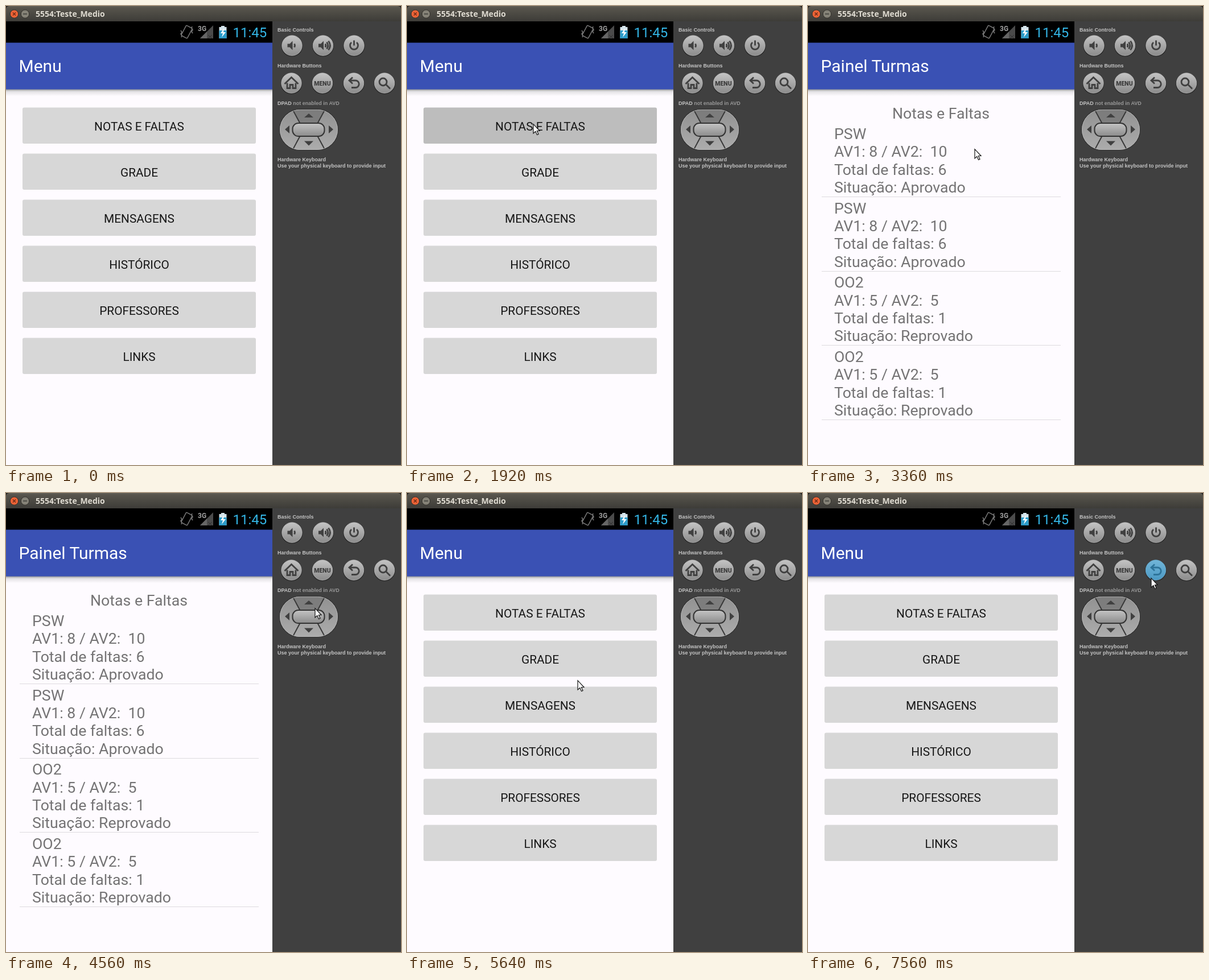
An HTML page that plays this animation: 694x807 px, repeating every 8 s.

```html
<!DOCTYPE html>
<html lang="pt">
<head>
<meta charset="utf-8">
<title>Menu</title>
<style>
  html, body { margin: 0; width: 100%; height: 100%; overflow: hidden; background: #1c1b19; }
  svg { display: block; width: 100%; height: 100%; }
  text { white-space: pre; font-family: Roboto, sans-serif; }
  .label { font: bold 9px "Liberation Sans", Arial, sans-serif; fill: #c3c3c3; }
  .heading { font-size: 30px; fill: #fff; }
  .item { font-size: 26.7px; fill: #747374; }
  .button { font-size: 20.8px; fill: #161616; text-anchor: middle; }
  .icon { fill: none; stroke: #404040; stroke-width: 2.8; }
  .solid { fill: #404040; stroke: none; }
  .hover .face { fill: url(#blue); stroke: #6fb0d2; }
  .hover .icon { stroke: #2d7399; }
</style>
</head>
<body>
<svg viewBox="0 0 694 807" xmlns="http://www.w3.org/2000/svg">
  <defs>
    <linearGradient id="bar" x2="0" y2="1">
      <stop stop-color="#625f56"/><stop offset=".12" stop-color="#57544c"/><stop offset="1" stop-color="#3c3b37"/>
    </linearGradient>
    <linearGradient id="shade" x2="0" y2="1">
      <stop stop-color="#8b8d92"/><stop offset=".12" stop-color="#b9babd"/>
      <stop offset=".35" stop-color="#e5e3e6"/><stop offset="1" stop-color="#fefbff"/>
    </linearGradient>
    <linearGradient id="metal" x2="0" y2="1">
      <stop stop-color="#c4c4c4"/><stop offset="1" stop-color="#8b8b8b"/>
    </linearGradient>
    <linearGradient id="pad" x2="0" y2="1">
      <stop stop-color="#919191"/><stop offset="1" stop-color="#acacac"/>
    </linearGradient>
    <linearGradient id="blue" x2="0" y2="1">
      <stop stop-color="#71b5d8"/><stop offset="1" stop-color="#4b99c4"/>
    </linearGradient>
    <clipPath id="padShape"><rect x="481" y="182" width="102" height="71" rx="36"/></clipPath>
  </defs>

  <!-- window frame -->
  <path d="M0 28V6Q0 0 6 0H688Q694 0 694 6V28Z" fill="url(#bar)"/>
  <circle cx="14.5" cy="14" r="7.2" fill="#ec6336" stroke="#33312c"/>
  <path d="M12 11.5l5 5m0-5l-5 5" stroke="#6b2b18" stroke-width="1.4"/>
  <circle cx="33.5" cy="14" r="7.2" fill="#858277" stroke="#33312c"/>
  <path d="M30 14h7" stroke="#3c3b37" stroke-width="1.5"/>
  <text x="52" y="19" fill="#e0dcd2" style="font:bold 14px 'Open Sans',sans-serif">5554:Teste_Medio</text>

  <!-- phone -->
  <rect y="27" width="468" height="780" fill="#fefbff"/>
  <rect y="27" width="468" height="38" fill="#000"/>
  <g fill="none" stroke="#777" stroke-width="1.5">
    <rect x="311.5" y="35.5" width="12" height="20" rx="1.5" transform="rotate(28 317.5 45.5)"/>
    <path d="M307 43l2 3-2 3 2 3-1 3M327 36l-1 3 2 3-2 3 2 3"/>
  </g>
  <path d="M364 34V57H341Z" fill="#4b4b4b"/>
  <path d="M353 45V57H341Z" fill="#666"/>
  <path d="M355 51l7 6m0-6l-7 6" stroke="#303030"/>
  <text x="337" y="44" fill="#a0a0a0" font-size="12" font-weight="bold">3G</text>
  <path d="M378 35h6v2h3.500v20h-13v-20h3.500z" fill="#d5e4eb"/>
  <path d="M374.500 43h13v14h-13z" fill="#2c9cca"/>
  <path d="M383 39l-6 9h4l-2 7 7-9h-4z" fill="#fff"/>
  <text x="398.500" y="55" fill="#33b5e5" font-size="24">11:45</text>
  <rect y="64.500" width="468" height="82.500" fill="#3a51b4"/>
  <rect y="146.500" width="468" height="12" fill="url(#shade)"/>
  <g id="menu"><text class="heading" x="22.500" y="116">Menu</text></g>
  <g id="grades">
    <text class="heading" x="22.500" y="116">Painel Turmas</text>
    <text class="item" x="233.500" y="198" text-anchor="middle">Notas e Faltas</text>
  </g>

  <!-- control panel -->
  <rect x="468" y="27" width="226" height="780" fill="#404040"/>
  <g>
    <text class="label" x="477" y="44.500">Basic Controls</text>
    <text class="label" x="477" y="107.500">Hardware Buttons</text>
    <text class="label" x="477" y="174">DPAD <tspan fill="#989898">not enabled in AVD</tspan></text>
    <text class="label" x="477" y="272.500">Hardware Keyboard</text>
    <text class="label" x="477" y="283.500">Use your physical keyboard to provide input</text>
  </g>
  <g id="controls"></g>
  <rect x="480" y="181" width="104" height="73" rx="36.500" fill="#2b2b2b"/>
  <g clip-path="url(#padShape)">
    <rect x="481" y="182" width="102" height="71" fill="url(#pad)"/>
    <path d="M503 180H561L547 207H517Z" fill="#7d7d7d"/>
    <path d="M503 181L517 207M561 181L547 207M503 254L517 228M561 254L547 228" stroke="#383838" stroke-width="2"/>
  </g>
  <rect x="481.500" y="182.500" width="101" height="70" rx="35" fill="none" stroke="#b9b9b9" stroke-width=".8"/>
  <rect x="503.500" y="206" width="56" height="23" rx="10" fill="url(#metal)" stroke="#333" stroke-width="2"/>
  <path class="solid" d="M524 196l8-7 8 7zM524 237.500l8 8 8-8zM498 210v14l-8-7zM567 210v14l8-7z"/>

  <path id="cursor" d="M0 .7V17L3.800 13.500 6.500 19.500 9 18.400 6.400 12.500H11Z"
        fill="#fff" stroke="#151515" stroke-width="1.200"/>
</svg>

<script>
const LOOP = 8000, TICK = 120, PITCH = 81, ROW = 130.7;
const $ = id => document.getElementById(id);

function add(parent, tag, attrs, text) {
  const node = document.createElementNS('http://www.w3.org/2000/svg', tag);
  for (const key in attrs) node.setAttribute(key, attrs[key]);
  if (text) node.textContent = text;
  return parent.appendChild(node);
}

const buttons = ['NOTAS E FALTAS', 'GRADE', 'MENSAGENS', 'HISTÓRICO', 'PROFESSORES', 'LINKS'].map((name, i) => {
  const y = 178.5 + i * PITCH;
  const box = add($('menu'), 'rect', { x: 29, y, width: 410, height: 63.5, rx: 3 });
  add($('menu'), 'text', { class: 'button', x: 234, y: y + 40 }, name);
  return box;
});

const passed = ['PSW', 'AV1: 8 / AV2:  10', 'Total de faltas: 6', 'Situação: Aprovado'];
const failed = ['OO2', 'AV1: 5 / AV2:  5', 'Total de faltas: 1', 'Situação: Reprovado'];
[passed, passed, failed, failed].forEach((lines, i) => {
  lines.forEach((line, j) =>
    add($('grades'), 'text', { class: 'item', x: 46, y: 234 + i * ROW + j * 31.3 }, line));
  add($('grades'), 'rect', { x: 24, y: Math.round(335 + i * ROW), width: 420, height: 1, fill: '#dddbde' });
});

const speaker = 'M-8 -3h4l5 -5v16l-5 -5h-4z';
const controls = [
  [502.5, 69.5, speaker, 'M4 -3q2 3 0 6'],
  [557, 69.5, speaker, 'M4 -3q2 3 0 6M6.5 -6q4.5 6 0 12M9.5 -8q6 8 0 16'],
  [611.5, 69.5, '', 'M-4.5 -5.5a7 7 0 1 0 9 0M0 -9v9'],
  [501.5, 135.5, '', 'M-12 1.5L0 -10 12 1.5M-7.5 0v9h5v-6h5v6h5v-9'],
  [556, 135.5, '', ''],
  [611, 135.5, '', 'M-2 -10L-8 -4.5 -2 1M-8 -4.5H3a6 6 0 0 1 0 12.5H-4'],
  [665, 135.5, '', 'M3 3l7 7M4 -2a6.5 6.5 0 1 1 -13 0a6.5 6.5 0 1 1 13 0']
].map(([x, y, solid, line], i) => {
  const group = add($('controls'), 'g', { transform: `translate(${x} ${y})` });
  add(group, 'circle', { r: 19, cy: .7, fill: '#2b2b2b' });
  add(group, 'circle', { class: 'face', r: 17.7, fill: 'url(#metal)', stroke: '#bcbcbc', 'stroke-width': .8 });
  if (solid) add(group, 'path', { class: 'solid', d: solid });
  if (line) add(group, 'path', { class: 'icon', d: line });
  if (i === 4) add(group, 'text', {
    y: 4, 'text-anchor': 'middle', fill: '#3d3d3d', 'font-size': 10.5, 'font-weight': 900
  }, 'MENU');
  return { x, y, group };
});

// Pointer path: time, x, y
const path = [
  [120, 518, 548], [240, 160, 482], [360, 160, 482], [600, 172, 410], [840, 205, 270],
  [1080, 222, 207], [3120, 222, 207], [3360, 293, 251], [3720, 588, 300], [3960, 335, 425],
  [4080, 300, 436], [4320, 390, 345], [4560, 543, 202], [4800, 608, 72], [4920, 610, 134],
  [5160, 608, 140], [5280, 570, 180], [5520, 366, 305], [5640, 300, 329], [5880, 262, 300],
  [6120, 280, 302], [6360, 454, 273], [6480, 505, 241], [6840, 601, 151], [6960, 603, 149],
  [LOOP, 603, 149]
];

function pointerAt(t) {
  const i = Math.max(1, path.findIndex(p => p[0] >= t));
  const [t0, x0, y0] = path[i - 1], [t1, x1, y1] = path[i];
  const k = (t - t0) / (t1 - t0);
  return [Math.round(x0 + (x1 - x0) * k), Math.round(y0 + (y1 - y0) * k)];
}

const within = (t, from, to) => t >= from && t < to;
const show = (node, on) => node.setAttribute('visibility', on ? 'visible' : 'hidden');

function draw(now) {
  const t = Math.floor(now % LOOP / TICK) * TICK;
  const inGrades = within(t, 3240, 5640);
  const [x, y] = pointerAt(t);
  const pressed = within(t, 1920, 3000) ? 0 : within(t, 6120, 7560) ? 1 : -1;
  show($('menu'), !inGrades);
  show($('grades'), inGrades);
  show($('cursor'), t >= 120);
  $('cursor').setAttribute('transform', `translate(${x} ${y})`);
  buttons.forEach((box, i) => box.setAttribute('fill', i === pressed ? '#bdbdbd' : '#d7d7d7'));
  controls.forEach(c => c.group.classList.toggle('hover', Math.hypot(x - c.x, y - c.y) < 18));
}

const start = performance.now();
function frame() {
  draw(performance.now() - start);
  requestAnimationFrame(frame);
}
frame();
</script>
</body>
</html>
```
